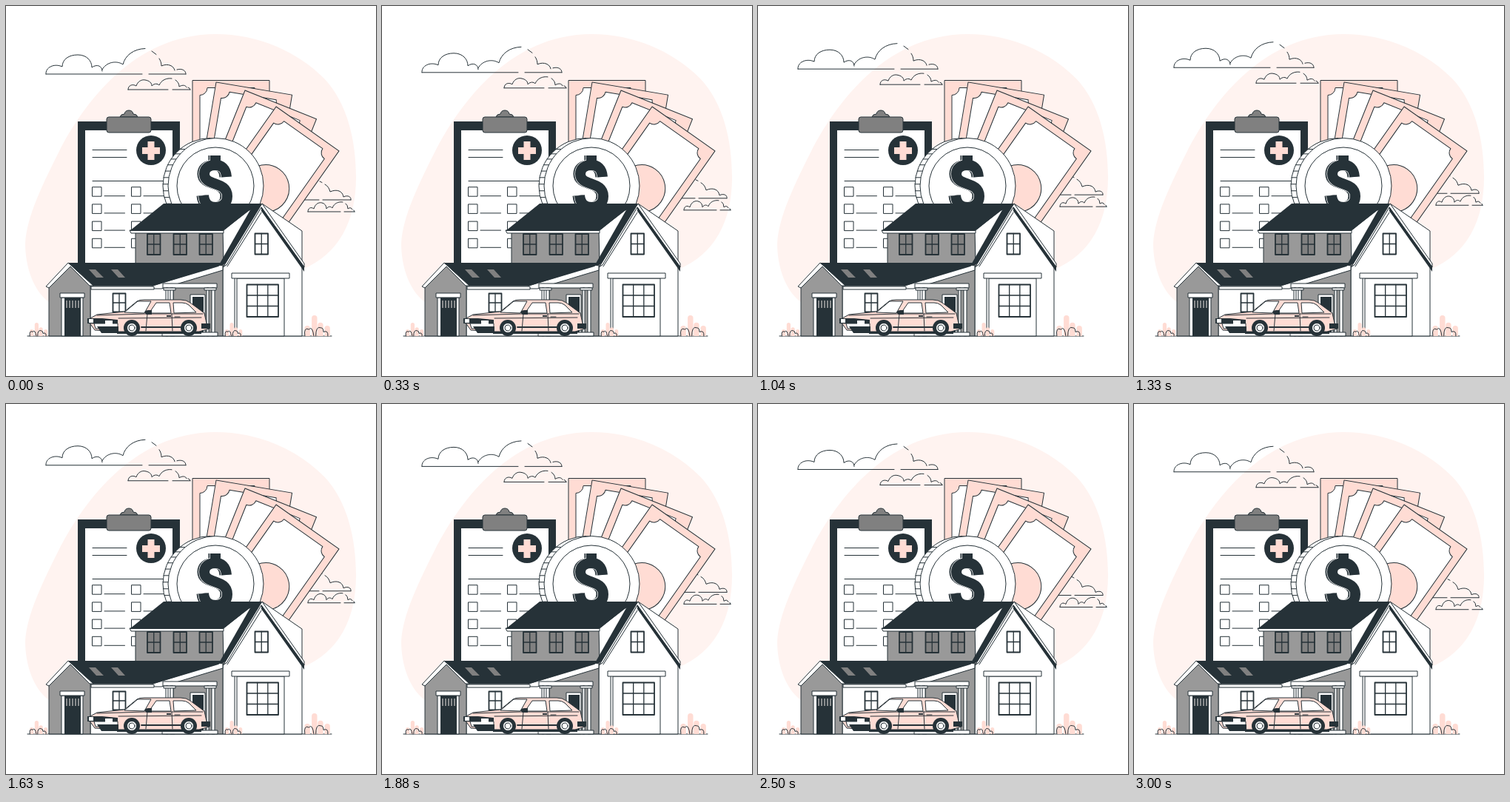
Recreate the animation shown at these times as an HTML page. Size 500 by 500 pixels, loop 3.04 s.

```html
<!DOCTYPE html>
<html lang="en">
<head>
<meta charset="utf-8">
<title>House, car and savings</title>
<style>
  html, body { margin: 0; width: 100%; height: 100%; overflow: hidden; background: #fff; }
  svg { display: block; width: 100%; height: 100%; }
  svg * { stroke-linejoin: round; }
  .line { fill: none; stroke: #263238; stroke-linecap: round; }
  .white { fill: #fff; stroke: #263238; }
  .gray { fill: #999; stroke: #263238; }
  .steel { fill: #808080; stroke: #263238; }
  .peach { fill: #ffdcd4; stroke: #263238; }
  .dark { fill: #263238; }
  .soft { fill: #ffdcd4; }
  .thick { stroke-width: 1.8; }
  .sign { fill: none; stroke: #263238; stroke-width: 14; }
</style>
</head>
<body>
<svg viewBox="0 0 500 500">
  <path fill="#fff3f0" d="M283 38C342 38 394 62 430 98C462 132 473 183 473 232C473 290 450 336 400 356L300 420L58 400C37 385 26 352 26 321C28 284 50 240 72 196C105 132 173 38 283 38Z"/>

  <g id="clouds" class="line">
    <path d="M54 92H184M193 92H243"/>
    <path d="M54 92C53 83 65 77 76 82C76 72 85 66 97 66C109 66 116 74 116 83C123 78 130 81 130 88M130 86C135 76 149 73 158 79C161 67 172 58 188 57.500M197 61L203 65.500M207 71C209 74 210 77 210 81C219 77 227 81 228 87M231 86C238 84 243 87 243 92"/>
    <path d="M165 113H219M225 113H249"/>
    <path d="M165 113C165 107 171 105 176 108C178 102 183 99 188 100C194 101 197 104 197 108C201 104 205 105 207 107C210 100 217 97 224 98M229 100C232 102 234 105 234 109C239 106 243 107 244 110M246 110Q249 111 249 113"/>
    <path d="M385 262H423M428 262H466"/>
    <path d="M397 250C401 241 411 235 421 236.500M424 237L427 238.500M431 241C435 243 437 247 438 251C447 247 455 250 456 258C462 255 467 258 466 262"/>
    <path d="M408 278H452M457 278H471"/>
    <path d="M408 278C408 273 412 271 416 274C418 267 423 265 427 266C431 267 433 270 433 274C436 270 439 271 441 273C443 267 449 264 455 265M459 267Q462 269 462 274Q466 271 468 275M470 276L471 278"/>
  </g>

  <g id="bills"></g>

  <g id="board">
    <path class="dark" d="M97 156H235V356H97Z"/>
    <path fill="#fff" d="M107 168H225V354H107Z"/>
    <path class="steel" d="M154 150Q155 146 160 146Q161 141 166 141Q171 141 172 146Q177 146 178 150Z"/>
    <rect class="steel" x="136" y="150" width="60" height="21" rx="3"/>
    <circle class="dark" cx="196" cy="195" r="20"/>
    <path class="soft" d="M191.500 183H200.500V191H208V200H200.500V208H191.500V200H184V191H191.500Z"/>
    <path class="line" d="M117 194.500H163M117 204.500H163M117 236.500H216"/>
  </g>

  <g id="coin">
    <circle class="white" cx="276.500" cy="243" r="64.500"/>
    <g id="ridges" class="line"></g>
    <circle class="white" cx="283.500" cy="243" r="64.500"/>
    <circle class="white" cx="283" cy="243" r="52"/>
    <defs>
      <path id="dollar" d="M298 231C297 219 291 215 283 215C273 215 268 220 268 227C268 244 299 236 299 257C299 267 292 272 283 272C273 272 268 266 267 256M283 202V215"/>
    </defs>
    <use href="#dollar" class="sign" x="-2.500"/>
    <use href="#dollar" class="sign" style="stroke:#fff;stroke-width:15.500"/>
    <use href="#dollar" class="sign"/>
  </g>

  <path class="line" d="M29 446H440"/>

  <g id="upper">
    <path class="gray" d="M175 303H294V355H175Z"/>
    <path class="white" d="M293 304L335 270L318 310L294 345Z"/>
    <path class="white" d="M167 303H294V307H169Z"/>
    <path class="dark" d="M167 304L213 267H346L328 277L293 304Z"/>
  </g>

  <g id="gable">
    <path class="white" d="M346 267L400 304V350Z"/>
    <path class="white" d="M345 272L293 354V446H400V352Z"/>
    <path class="dark" d="M335 267H346L297 348L286 353Z"/>
    <path class="white" d="M346 267L403 348V353L345 272L298 350L294 352Z"/>
    <path class="dark" d="M345 271L403 352V359L345 277Z"/>
    <path class="line" d="M345 279L299 352"/>
    <path class="white" d="M312 368H376V446H312Z"/>
    <path class="line" d="M309 368V446"/>
    <path class="white" d="M305 361H383V368H305Z"/>
  </g>

  <g id="porch">
    <path class="white" d="M114 378H228V446H114Z"/>
    <path class="gray" d="M210 380L293 353V446H226V380Z"/>
    <path class="white" d="M198 378L288 350L293 351V357L210 382H198Z"/>
    <path class="white" d="M249 390H269V446H249Z"/>
    <path class="dark" d="M252 393H267V446H252Z"/>
    <path class="white" d="M212 375H285V381H212Z"/>
    <path class="white" d="M216 381H219V446H216ZM222 381H226V446H222ZM271 381H274V446H271ZM278 381H282V446H278Z"/>
    <path class="white" d="M213 381H229V384H213ZM268 381H284V384H268ZM211 441H286V446H211Z"/>
  </g>

  <g id="garage">
    <path class="gray" d="M86 350L58 378V446H114V377Z"/>
    <path class="dark" d="M84 347H294L287 352L200 378H115Z"/>
    <path class="white" d="M84 347L54 379L58 381L87 352L113 378H118Z"/>
    <path class="white" d="M115 379H200V383H115Z"/>
    <path fill="#808080" d="M112 356H121L132 367H122ZM142 356H151L161 367H152Z"/>
    <path class="white" d="M75 394H104V446H75Z"/>
    <path class="dark" d="M79 394H101V446H79Z"/>
    <path d="M82 398V408M86 398V408M90 398V408M94 398V408M98 398V408" stroke="#aaa" stroke-width="1.500"/>
    <path class="white" d="M73 388H106V394H73Z"/>
  </g>

  <g id="windows"></g>
  <g id="bushes"></g>

  <g id="car">
    <path class="dark" d="M150 436H264V443H150Z"/>
    <path class="peach" d="M110 424L123 417L160 413L177 399Q180 397 187 397H236Q244 397 249 401L268 415L271 429L275 431V436L261 440H152L120 438Z"/>
    <path class="white" d="M160 414L178 399H196L187 415Z"/>
    <path class="white" d="M194 414L203 401H221L223 415H194ZM226 401H238Q243 401 247 404L257 414L227 415Z"/>
    <path class="line" d="M123 418L187 416H266M191 416L189 439M224 416L225 439M152 422L264 421M228 420H235"/>
    <path class="line thick" d="M183 434H236"/>
    <path class="dark" d="M110 422H130L151 424V431L110 429ZM264 429H276V436H264ZM187 414Q188 411 193 411H197V417H190ZM217 418H223V420H217Z"/>
    <path class="white" d="M119 429H151V436H121Z"/>
    <path class="dark" d="M123 433H152V442H129Z"/>
    <path fill="#fff" d="M112 423H118V428H112ZM134 425H144V430H134Z"/>
    <g id="wheels"></g>
  </g>
</svg>

<script>
const $ = id => document.getElementById(id);
const add = (id, html) => $(id).insertAdjacentHTML('beforeend', html);

function bill(x, y, angle) {
  const w = 104, h = 197, m = 10, n = 10;
  add('bills', `<g transform="translate(${x} ${y}) rotate(${angle})">
    <rect class="peach" width="${w}" height="${h}"/>
    <path class="white" d="M${m + n} ${m}H${w - m - n}a${n} ${n} 0 0 0 ${n} ${n}V${h - m - n}
      a${n} ${n} 0 0 0 ${-n} ${n}H${m + n}a${n} ${n} 0 0 0 ${-n} ${-n}V${m + n}a${n} ${n} 0 0 0 ${n} ${-n}z"/>
    <circle class="peach" cx="${w / 2}" cy="${h / 2}" r="32"/></g>`);
}
bill(252, 100.5, 0);
bill(284, 103, 9.5);
bill(323, 114, 21.9);
bill(365, 136, 35.2);

for (const x of [116.5, 169.5])
  for (let row = 0; row < 4; row++) {
    const y = 244.7 + row * 23.2;
    add('board', `<rect class="white" x="${x}" y="${y}" width="12.5" height="12.5"/>
      <path class="line" d="M${x + 16.5} ${y + 12}h27.500"/>`);
  }

for (let a = 150; a <= 230; a += 8) {
  const r = a * Math.PI / 180;
  add('ridges', `<path d="M${276.5 + 64.5 * Math.cos(r)} ${243 + 64.5 * Math.sin(r)}h7"/>`);
}

function pane(x, y, w, h, cols, rows, fill) {
  let bars = '';
  for (let i = 1; i < cols; i++) bars += `M${x + w * i / cols} ${y}v${h}`;
  for (let i = 1; i < rows; i++) bars += `M${x} ${y + h * i / rows}h${w}`;
  add('windows', `<rect class="white thick" x="${x}" y="${y}" width="${w}" height="${h}" style="fill:${fill}"/>
    <path class="line" stroke-width="1.3" d="${bars}"/>`);
}
for (const x of [191, 226.5, 261.5]) pane(x, 308, 17.5, 28, 2, 2, '#808080');
pane(336.5, 307.5, 17.5, 28, 2, 2, '#fff');
pane(325.5, 376.5, 42.5, 43.5, 3, 3, '#fff');
pane(144.5, 388.5, 17, 25, 2, 2, '#fff');

for (const x of [170, 247])
  add('wheels', `<circle class="dark" cx="${x}" cy="435" r="11"/>
    <circle class="white" cx="${x}" cy="435" r="6.5"/><circle class="line" cx="${x}" cy="435" r="4"/>`);

function bush(x, w, h) {
  const r = w * .1;
  for (const [at, tall] of [[.14, .5], [.4, 1], [.62, .65], [.87, .5]]) {
    const cx = x + w * at, top = 446 - h * tall;
    add('bushes', `<path class="soft" d="M${cx - r} 446V${top + r}a${r} ${r} 0 0 1 ${2 * r} 0V446z"/>`);
  }
  add('bushes', `<path class="line" d="M${x + w * .05} 446q${-w * .05} ${-h * .45} ${w * .15} ${-h * .32}
    q${w * .12} ${-h * .2} ${w * .18} ${h * .32}M${x + w * .45} 446q0 ${-h * .5} ${w * .18} ${-h * .4}
    q${w * .1} 0 ${w * .1} ${h * .2}q${w * .18} ${-h * .1} ${w * .16} ${h * .2}"/>`);
}
bush(31, 26, 18);
bush(295, 25, 18);
bush(402, 37, 28);

// The clouds rise 10 px and sink again at a steady speed.
const LOOP = 3040;
function draw() {
  const p = performance.now() % LOOP / LOOP;
  const lift = 10 * (1 - Math.abs(1 - 2 * p));
  $('clouds').setAttribute('transform', `translate(0 ${-lift})`);
  requestAnimationFrame(draw);
}
draw();
</script>
</body>
</html>
```
